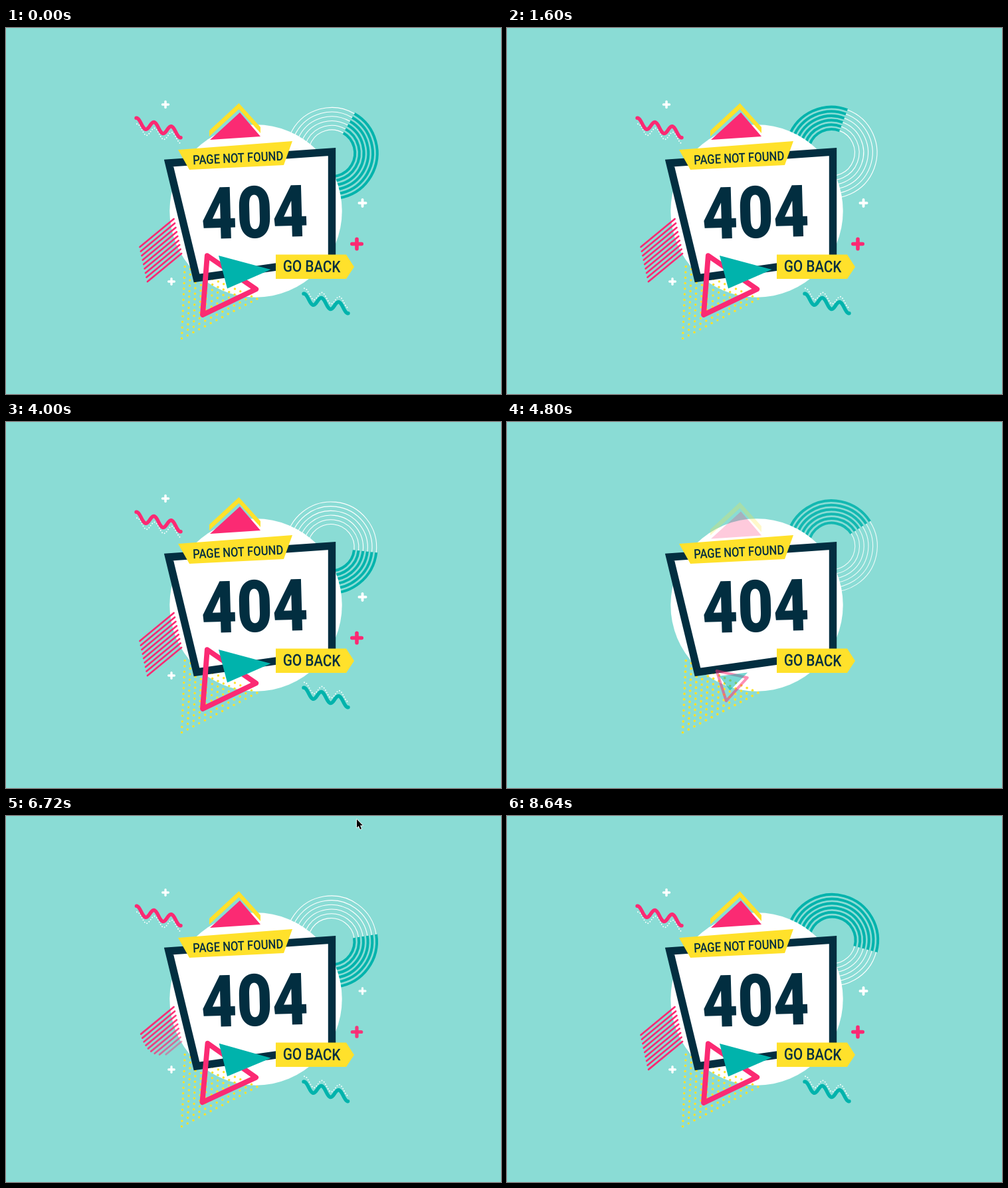
An HTML page with a canvas that plays this animation: 745 by 550 pixels, repeating every 8.8 s.

```html
<!DOCTYPE html>
<html lang="en">
<head>
<meta charset="utf-8">
<title>Page not found</title>
<style>
html, body { margin: 0; width: 100%; height: 100%; overflow: hidden; background: #8adcd5; }
canvas { display: block; }
</style>
</head>
<body>
<canvas id="stage" width="745" height="550"></canvas>
<script>
const ctx = document.getElementById('stage').getContext('2d');
const LOOP = 8800, STEP = 160, RELOAD = 4560;
const BG = '#8adcd5', DARK = '#022e40', YELLOW = '#ffe12b', PINK = '#fb2a73', TEAL = '#00b3ac', WHITE = '#fff';

const clamp = v => Math.max(0, Math.min(1, v));
const lerp = (a, b, k) => a + (b - a) * k;
const radians = degrees => degrees * Math.PI / 180;

// A tilted cosine, two and a half periods long.
const wave = Array.from({ length: 68 }, (_, i) => {
  const x = i - 33.5;
  return [x, 0.24 * x - 6.9 * Math.cos(2 * Math.PI * (x + 6.5) / 26)];
});
const waveLength = wave.slice(1).reduce(
  (sum, [x, y], i) => sum + Math.hypot(x - wave[i][0], y - wave[i][1]), 0);

// Exponential ease-out since the last page load.
function intro(t, delay, duration = 2200) {
  if (t < RELOAD) return 1;
  const x = (t - RELOAD - delay) / duration;
  return x <= 0 ? 0 : x >= 1 ? 1 : 1 - 2 ** (-10 * x);
}

function layer(alpha, draw) {
  if (alpha <= 0) return;
  ctx.save();
  ctx.globalAlpha = alpha;
  draw();
  ctx.restore();
}

function trace(points, closed = true) {
  ctx.beginPath();
  points.forEach(([x, y]) => ctx.lineTo(x, y));
  if (closed) ctx.closePath();
}

function poly(color, points) {
  trace(points);
  ctx.fillStyle = color;
  ctx.fill();
}

function pen(color, width, cap = 'round', join = 'round') {
  ctx.strokeStyle = color;
  ctx.lineWidth = width;
  ctx.lineCap = cap;
  ctx.lineJoin = join;
}

function line(x1, y1, x2, y2) {
  trace([[x1, y1], [x2, y2]], false);
  ctx.stroke();
}

function dot(x, y, r, color) {
  ctx.beginPath();
  ctx.arc(x, y, r, 0, 2 * Math.PI);
  ctx.fillStyle = color;
  ctx.fill();
}

// All lettering shares one condensed face.
function label(text, x, y, size, weight, degrees) {
  ctx.save();
  ctx.translate(x, y);
  ctx.rotate(radians(degrees));
  ctx.scale(0.855, 1);
  ctx.font = `${weight} ${size}px Roboto, sans-serif`;
  ctx.textAlign = 'center';
  ctx.fillStyle = DARK;
  ctx.fillText(text, 0, 0);
  ctx.restore();
}

function drawRings(t) {
  const degrees = t < RELOAD ? 300 + 0.1066 * t : 147 + 0.1063 * (t - 4800);
  const alpha = t < RELOAD ? 1 : clamp((t - RELOAD) / 280);
  layer(alpha, () => {
    ctx.translate(489.3, 187.5);
    ctx.rotate(radians(degrees));
    for (let i = 0; i < 6; i++) {
      for (const [color, width, from] of [[TEAL, 4, 0], [WHITE, 1.1, Math.PI]]) {
        pen(color, width, 'butt');
        ctx.beginPath();
        ctx.arc(0, 1, 35 + 6.7 * i, from, from + Math.PI);
        ctx.stroke();
      }
    }
  });
}

function drawDots(t) {
  const rows = 13, r = lerp(2, 1.75, intro(t, 0));
  for (let i = 0; i <= rows; i++) {
    for (let j = 0; i + j <= rows; j++) {
      dot(264.5 + 8.72 * i + 0.36 * j, 466.5 - 4.58 * i - 8.3 * j, r, YELLOW);
    }
  }
}

function drawStripes(t) {
  const count = 9;
  for (let i = 0; i < count; i++) {
    const p = intro(t, 1070 + i * 112), k = i / (count - 1);
    layer(p, () => {
      pen(PINK, 2.8);
      const x = lerp(252.5, 264, k), y = lerp(287, 339, k);
      line(x, y, x - 51 * p, y + 42 * p);
    });
  }
}

function drawWave(t, x, y, color, dotsY, fromEnd) {
  const p = intro(t, 410);
  layer(p, () => {
    ctx.translate(x, y);
    trace(wave.map(([px, py]) => [px + 1, py + dotsY]), false);
    pen(WHITE, 1.9);
    ctx.setLineDash([0, 4]);
    ctx.stroke();
    ctx.globalAlpha = 1;
    trace(wave, false);
    pen(color, 5.4);
    ctx.setLineDash(p < 1 ? [p * waveLength, 999] : []);
    ctx.lineDashOffset = fromEnd ? (p - 1) * waveLength : 0;
    ctx.stroke();
  });
}

function drawRoof(t) {
  const p = intro(t, 150);
  layer(p, () => {
    ctx.translate(0, 10 * (1 - p));
    const ridge = [[306, 154], [350.5, 113], [383, 149]];
    const eaves = ridge.map(([x, y]) => [x, y + 9]).reverse();
    poly(YELLOW, [...ridge, ...eaves]);
    poly(PINK, [[352, 127], [383, 163], [307, 168]]);
  });
}

function drawPanel() {
  poly(WHITE, [[245, 203], [490.5, 186], [490.5, 347.2], [287, 376]]);
  pen(DARK, 11.4, 'butt', 'miter');
  ctx.stroke();
  poly(YELLOW, [[259, 183], [431, 170], [418, 206], [276, 213]]);
  poly(YELLOW, [[406, 340.5], [512, 340.5], [524, 359], [512, 377], [406, 377]]);
  label('PAGE NOT FOUND', 349.5, 202, 19.5, 500, -2.7);
  label('404', 375, 315, 108.5, 800, -1.6);
  label('GO BACK', 460, 366.5, 24.2, 500, 0.8);
}

function drawTriangles(t) {
  const p = intro(t, 0), rest = 1 - p;
  const spin = (x, y, draw) => layer(p, () => {
    ctx.translate(346 + x * rest, 388 + y * rest);
    ctx.rotate(rest * 4 * Math.PI);
    ctx.scale(p, p);
    ctx.translate(-346, -388);
    draw();
  });
  spin(0, 0, () => {
    const corners = [0, 1, 2].map(i => radians(4.4 + 120 * i));
    trace(corners.map(a => [325 + 51.4 * Math.cos(a), 388.5 + 51.4 * Math.sin(a)]));
    pen(PINK, 7.8);
    ctx.stroke();
  });
  spin(-10, 24, () => poly(TEAL, [[320, 342], [398.5, 363], [333, 391.5]]));
}

function drawPlus(t, order, x, y, size, color) {
  const p = intro(t, 1480 + order * 110, 1200);
  layer(p, () => {
    ctx.translate(x, y);
    ctx.scale(p, p);
    pen(color, size * 0.28);
    const arm = size * 0.36;
    line(-arm, 0, arm, 0);
    line(0, -arm, 0, arm);
  });
}

function cursorAt(t) {
  if (t >= 960 && t <= 1120) {
    const k = (t - 960) / 160;
    return [lerp(638, 545, k), lerp(150, 31, k)];
  }
  if (t >= 6720 && t < 8000) {
    const k = (t - 6720) / 1280;
    return [528 + 80 * Math.sin(Math.PI * k) ** 4, 5 + 596 * k ** 1.2];
  }
}

function drawCursor(t) {
  const tip = cursorAt(t);
  if (!tip) return;
  layer(1, () => {
    ctx.translate(...tip);
    trace([[0, 0], [0, 12.5], [2.8, 10], [5, 15], [7, 14.2], [5, 9.2], [8.8, 9]]);
    pen(WHITE, 1.6);
    ctx.stroke();
    ctx.fillStyle = '#000';
    ctx.fill();
  });
}

function render(now) {
  const t = Math.floor(now % LOOP / STEP) * STEP;
  ctx.fillStyle = BG;
  ctx.fillRect(0, 0, 745, 550);
  drawRings(t);
  dot(376, 275, 129.7, WHITE);
  drawDots(t);
  drawStripes(t);
  drawRoof(t);
  drawPanel();
  drawTriangles(t);
  drawWave(t, 229.5, 150, PINK, 9, true);
  drawWave(t, 481.5, 414, TEAL, -8, false);
  drawPlus(t, 0, 249, 381, 12, WHITE);
  drawPlus(t, 1, 240, 115, 12.5, WHITE);
  drawPlus(t, 2, 528, 324.5, 20, PINK);
  drawPlus(t, 3, 536.5, 263, 14, WHITE);
  drawCursor(t);
}

let began = null;
function tick() {
  const now = performance.now();
  if (began === null) began = now;
  render(now - began);
  requestAnimationFrame(tick);
}
tick();
</script>
</body>
</html>
```
